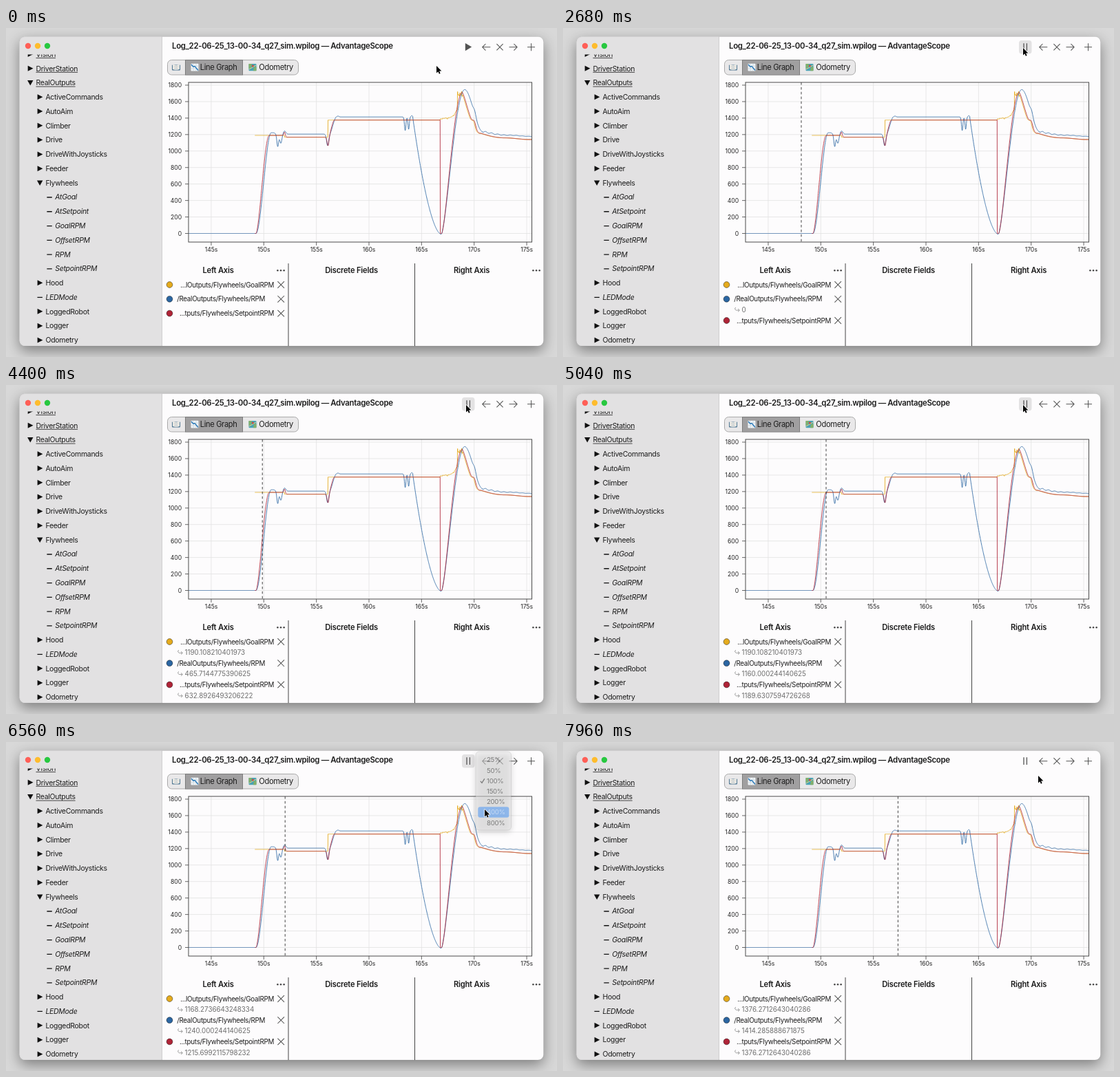
An HTML page with a canvas that plays this animation: 800 px wide and 478 px high, repeating every 8000 ms.

```html
<!DOCTYPE html>
<html lang="en">
<head>
<meta charset="utf-8">
<title>Log viewer</title>
<style>
html, body { margin: 0; width: 100%; height: 100%; overflow: hidden; background: #d8d8d8; }
canvas { display: block; width: 800px; height: 478px; }
</style>
</head>
<body>
<canvas id="stage"></canvas>
<script>
const W = 800, H = 478, LOOP = 8000, STEP = 40;
const canvas = document.getElementById('stage');
const ctx = canvas.getContext('2d');
const dpr = window.devicePixelRatio || 1;
canvas.width = W * dpr;
canvas.height = H * dpr;

const GOLD = '#e5ab1d', BLUE = '#2b66a2', RED = '#af2437', INK = '#1c1c1c', ICON = '#545454';
const GRAPH = { l: 265, t: 79, r: 763.5, b: 311 };
const PX_PER_SEC = 15.27;
const yOf = rpm => 298.5 - rpm * 0.11972;

const SET_TIME = 1400, PLAY_TIME = 2280, FAST_TIME = 6655;
const MENU_OPEN = 5400, MENU_CLOSE = 6480, MENU_FADE = 160;
const START_X = 339.86;

// ---------- motion rules ----------
// Chain of eased moves [from, to, value, skew]; holds each value until the next move
function staged(x, value, stages) {
  for (const [a, b, next, skew = 1] of stages) {
    if (x <= a) break;
    const u = x >= b ? 1 : ((x - a) / (b - a)) ** skew;
    value = u === 1 ? next : value + (next - value) * u * u * (3 - 2 * u);
  }
  return value;
}
function bump(x, center, width, height) {
  const d = (x - center) / width;
  return Math.abs(d) > 3 ? 0 : height * Math.exp(-d * d);
}
function noise(n) {
  const s = Math.sin(n * 12.9898) * 43758.5453;
  return (s - Math.floor(s)) * 2 - 1;
}

// ---------- signals, by horizontal position ----------
const SHOT_1 = 1190.108210401973, SHOT_2 = 1168.2736643248334, SHOT_3 = 1376.2712643040286;
const DATA_X = 361.3, NOISE_X = 630.4, SPIKE_X = 655.5, SPIKE_END = 663;

function wheel(x) {
  if (x > 631.5) {
    const ripple = x > 692 ? 9 * Math.exp((692 - x) / 35) * Math.sin((x - 694) * 0.7) : 0;
    return staged(x, -8, [[632, 666, 1746, 0.8], [666, 692, 1235], [692, 730, 1192, 0.7], [730, 763, 1178]])
      + bump(x, 680.5, 2.5, 45) + ripple;
  }
  if (x > 590.5) return 1422 * ((631.5 - x) / 41) ** 1.7 - 8;
  return staged(x, 0, [[363, 385, 1222], [388, 394, 1205.714], [469, 480, 1414.286]])
    + bump(x, 394.5, 1.75, -150) + bump(x, 399, 2.2, -111) + bump(x, 404.5, 2.5, 38)
    + bump(x, 467, 2.2, -140) + bump(x, 482, 2, 10)
    + bump(x, 579.6, 1.5, -165) + bump(x, 584.6, 1.4, -150) + bump(x, 589.2, 1.4, 16);
}
function setpoint(x) {
  return staged(x, 0, [
    [362.8, 382.256, SHOT_1, 0.9], [403, 408, SHOT_2], [467.5, 477, SHOT_3], [NOISE_X, NOISE_X, 0],
    [632.5, 662.5, 1712, 0.8], [662.5, 689, 1215, 0.7], [690, 725, 1160, 0.6], [725, 760, 1140]
  ]) + bump(x, 404.5, 1.4, 45) + bump(x, 467.5, 1.8, -104) + bump(x, 680, 3, 70);
}
function goal(x) {
  if (x > SPIKE_END) return setpoint(x + 1.3);
  if (x > SPIKE_X) return 1690 + 35 * noise(Math.floor(x * 1.5));
  if (x > NOISE_X) return 1395 + 110 * ((x - NOISE_X) / 25) ** 4 + 10 * noise(Math.floor(x / 1.6));
  return staged(x, SHOT_1, [[404.4, 404.4, SHOT_2], [467.4, 467.4, SHOT_3]]);
}

function trace(signal, from) {
  const path = new Path2D();
  for (let x = from; x <= GRAPH.r; x += 0.25) path.lineTo(x, yOf(signal(x)));
  return path;
}
const TRACES = [
  [trace(goal, DATA_X), GOLD], [trace(wheel, GRAPH.l), BLUE], [trace(setpoint, DATA_X), RED]
];

// ---------- values under the playhead ----------
const goalValue = x => x < DATA_X ? null : goal(x);
const setpointValue = x => x < DATA_X ? null : Math.max(2, setpoint(x));
// Encoder speed: whole ticks, stored in single precision
function wheelValue(x) {
  const tick = Math.round(wheel(x) * 7 / 20);
  return tick <= 0 ? 0 : Math.fround(tick * 20 / 7 + 0.0002);
}

// ---------- timing ----------
function pointerAt(t) {
  return {
    x: staged(t, 625, [[300, 1150, 340], [1500, 2150, 668], [5450, 5950, 695], [6720, 7050, 690]]),
    y: staged(t, 55, [[300, 1150, 190], [1500, 2150, 29], [5450, 5950, 98], [6720, 7050, 49]])
  };
}
function playheadAt(t) {
  if (t < SET_TIME) return null;
  const slow = Math.max(0, Math.min(t, FAST_TIME) - PLAY_TIME);
  const fast = Math.max(0, t - FAST_TIME);
  return START_X + (slow + 4 * fast) * PX_PER_SEC / 1000;
}

// ---------- drawing helpers ----------
function text(s, x, y, size, o = {}) {
  ctx.font = `${o.italic ? 'italic ' : ''}${o.weight || 400} ${size}px Inter, Roboto, sans-serif`;
  ctx.letterSpacing = (o.gap ?? -0.3) + 'px';
  ctx.textAlign = o.align || 'left';
  ctx.fillStyle = o.color || INK;
  ctx.fillText(s, x, y + size * 0.36);
}
function box(x, y, w, h, r, fill, stroke) {
  ctx.beginPath();
  ctx.roundRect(x, y, w, h, r);
  if (fill) { ctx.fillStyle = fill; ctx.fill(); }
  if (stroke) { ctx.strokeStyle = stroke; ctx.lineWidth = 1; ctx.stroke(); }
}
function poly(points, fill) {
  ctx.beginPath();
  for (let i = 0; i < points.length; i += 2) ctx.lineTo(points[i], points[i + 1]);
  ctx.closePath();
  ctx.fillStyle = fill;
  ctx.fill();
}
function line(color, width, ...strokes) {
  ctx.beginPath();
  for (const s of strokes) {
    ctx.moveTo(s[0], s[1]);
    for (let i = 2; i < s.length; i += 2) ctx.lineTo(s[i], s[i + 1]);
  }
  ctx.strokeStyle = color;
  ctx.lineWidth = width;
  ctx.stroke();
}
function dot(x, y, r, fill, stroke) {
  ctx.beginPath();
  ctx.arc(x, y, r, 0, 7);
  ctx.fillStyle = fill;
  ctx.fill();
  if (stroke) { ctx.strokeStyle = stroke; ctx.lineWidth = 0.8; ctx.stroke(); }
}
function cross(x, y, r) {
  line(ICON, 1.05, [x - r, y - r, x + r, y + r], [x + r, y - r, x - r, y + r]);
}
function arrow(x, y, dir) {
  const tip = x + dir * 5.8, back = tip - dir * 4.7;
  line(ICON, 1.05, [x - dir * 5.8, y, tip, y], [back, y - 4.8, tip, y, back, y + 4.8]);
}

// ---------- parts ----------
// kind: > closed group, v open group, - field
const TREE = [
  '0>Vision', '0>DriverStation', '0vRealOutputs', '1>ActiveCommands', '1>AutoAim', '1>Climber',
  '1>Drive', '1>DriveWithJoysticks', '1>Feeder', '1vFlywheels', '2-AtGoal', '2-AtSetpoint',
  '2-GoalRPM', '2-OffsetRPM', '2-RPM', '2-SetpointRPM', '1>Hood', '1-LEDMode',
  '1>LoggedRobot', '1>Logger', '1>Odometry'
];
function sidebar() {
  ctx.fillStyle = '#e2e1e2';
  ctx.fillRect(19, 12, 207.5, 451);
  line('#cfcecf', 1, [226.5, 12, 226.5, 463]);
  ['#ff5f57', '#febc2e', '#28c840'].forEach((c, i) => dot(32 + 14 * i, 26, 4.2, c));
  ctx.save();
  ctx.beginPath();
  ctx.rect(19, 38.5, 207, 424);
  ctx.clip();
  TREE.forEach((row, i) => {
    const level = +row[0], kind = row[1], name = row.slice(2);
    const y = 38 + 20.77 * i, x = 35.3 + 13.9 * level, tx = x + 8.2;
    if (kind === '>') poly([x - 3.6, y - 4, x + 4.2, y, x - 3.6, y + 4], '#111');
    else if (kind === 'v') poly([x - 4.2, y - 3.5, x + 4.2, y - 3.5, x, y + 4], '#111');
    else line('#111', 1.3, [x - 3.7, y + 0.3, x + 3.7, y + 0.3]);
    text(name, tx, y, 10.5, { italic: kind === '-' });
    if (level === 0) {
      const w = ctx.measureText(name).width;
      line(INK, 0.8, [tx, y + 5.6, tx + w, y + 5.6]);
    }
  });
  ctx.restore();
}

function tabs() {
  box(234.5, 46.5, 190, 21.5, 6, '#e9e8e9', '#aaa');
  ctx.fillStyle = '#a09fa0';
  ctx.fillRect(260, 47, 84, 20.5);
  ctx.strokeStyle = '#7c7c7c';
  ctx.strokeRect(260.5, 46.5, 83, 21.5);
  // book
  box(241, 53.5, 12, 8, 1, '#4b7390');
  poly([242, 53, 246.8, 54, 246.8, 61, 242, 60], '#f4f1ea');
  poly([252, 53, 247.2, 54, 247.2, 61, 252, 60], '#f4f1ea');
  for (const y of [55.5, 58]) line('#a9b0b5', 0.6, [243, y, 246, y + 0.5], [248, y + 0.5, 251, y]);
  // falling chart
  box(268.5, 51.7, 11, 10.8, 1, '#f1f5f8');
  line('#b9cbd6', 0.6, [272, 52, 272, 62], [276, 52, 276, 62], [269, 55.3, 279, 55.3], [269, 59, 279, 59]);
  line('#2878b8', 1.4, [269, 53, 272, 56.5, 274, 55.5, 279, 61.5]);
  // map
  box(352.5, 52, 11, 10.3, 1, '#49a3b5');
  poly([352.5, 52, 357, 52, 355.5, 58, 352.5, 59], '#83b06a');
  poly([359, 62.3, 360, 57, 363.5, 56, 363.5, 62.3], '#83b06a');
  line('#e6d587', 1, [353, 60, 358, 57, 363, 54]);
  dot(358.3, 55, 1.5, '#cf4a3c');
  text('Line Graph', 281.7, 57, 11.1, { gap: -0.33 });
  text('Odometry', 367.3, 57, 11.1, { gap: -0.33 });
}

function toolbar(t, hot) {
  text('Log_22-06-25_13-00-34_q27_sim.wpilog — AdvantageScope', 241, 26.2, 11.4, { weight: 600, gap: -0.31 });
  if (hot) box(662, 18, 18.5, 19.5, 4, '#e3e2e3');
  if (t < PLAY_TIME) poly([666.8, 22, 676.2, 27.6, 666.8, 33.2], ICON);
  else line(ICON, 1.3, [669, 22.3, 669, 33], [673.4, 22.3, 673.4, 33]);
  const y = 27.8;
  arrow(697.5, y, -1);
  cross(717, y, 4.6);
  arrow(736.3, y, 1);
  line(ICON, 1.05, [757, y, 768, y], [762.5, y - 5.5, 762.5, y + 5.5]);
}

function playhead(x, alpha) {
  ctx.save();
  ctx.globalAlpha = alpha;
  ctx.setLineDash([3.6, 3.3]);
  line('#222', 0.85, [x, GRAPH.t, x, GRAPH.b]);
  ctx.restore();
}

function graph(head, hover) {
  const { l, t, r, b } = GRAPH;
  const label = { gap: -0.05, color: '#222' };
  for (let v = 0; v <= 1800; v += 200) {
    const y = yOf(v);
    line('#e2e2e2', 0.8, [l, y, r, y]);
    line('#555', 0.9, [l - 5, y, l, y]);
    text(v, 255, y, 8.6, { ...label, align: 'right' });
  }
  for (let s = 145; s <= 175; s += 5) {
    const x = 374.3 + (s - 150) * PX_PER_SEC;
    line('#e2e2e2', 0.8, [x, t, x, b]);
    line('#555', 0.9, [x, b, x, b + 5]);
    text(s + 's', x, 321.5, 8.6, { ...label, align: 'center' });
  }
  ctx.save();
  ctx.beginPath();
  ctx.rect(l, t, r - l, b - t);
  ctx.clip();
  ctx.lineWidth = 0.85;
  ctx.lineJoin = 'round';
  for (const [path, color] of TRACES) {
    ctx.strokeStyle = color;
    ctx.stroke(path);
  }
  if (head !== null) playhead(head, 1);
  if (hover !== null) playhead(hover, 0.35);
  ctx.restore();
  ctx.strokeStyle = '#4a4a4a';
  ctx.lineWidth = 1;
  ctx.strokeRect(l, t, r - l, b - t);
}

function more(x) {
  for (let i = -1; i <= 1; i++) dot(x + i * 4.6, 352.3, 1.25, '#444');
}

function legend(head) {
  const bold = { weight: 600, align: 'center', gap: -0.22 };
  text('Left Axis', 308, 352.3, 11.2, bold);
  text('Discrete Fields', 501.5, 352.3, 11.2, bold);
  text('Right Axis', 676, 352.3, 11.2, bold);
  more(399);
  more(770);
  line('#444', 1, [410, 342, 410, 462], [593.5, 342, 593.5, 462]);
  const rows = [
    [GOLD, '...lOutputs/Flywheels/GoalRPM', goalValue, 389],
    [BLUE, '/RealOutputs/Flywheels/RPM', wheelValue, 376],
    [RED, '...tputs/Flywheels/SetpointRPM', setpointValue, 389]
  ];
  let y = 373;
  for (const [color, name, valueAt, right] of rows) {
    dot(237.5, y, 4.4, color, 'rgba(0,0,0,.55)');
    text(name, right, y, 9.8, { align: 'right', gap: -0.27 });
    cross(399.2, y, 4.8);
    const value = head === null ? null : valueAt(head);
    if (value !== null) {
      const v = y + 15.6;
      line('#888', 0.8, [256, v + 0.7, 251.3, v + 0.7, 249.8, v - 0.6, 249.8, v - 2.5, 251, v - 3.4],
        [254, v - 1.5, 256.4, v + 0.7, 254, v + 2.9]);
      text(value, 259.6, v, 9.8, { gap: -0.04, color: '#6e6e6e' });
      y += 10.4;
    }
    y += 20.8;
  }
}

function menu(t, p) {
  ctx.save();
  ctx.globalAlpha = Math.min(1, 1 - (t - MENU_CLOSE) / MENU_FADE);
  ctx.shadowColor = 'rgba(0,0,0,.32)';
  ctx.shadowBlur = 9 * dpr;
  ctx.shadowOffsetY = 3 * dpr;
  box(682, 14, 51.5, 114, 5, '#e8e7e8');
  ctx.shadowColor = 'transparent';
  box(682, 14, 51.5, 114, 5, null, 'rgba(0,0,0,.16)');
  [25, 50, 100, 150, 200, 400, 800].forEach((speed, i) => {
    const y = 26 + 15.2 * i;
    const on = p.x > 682 && Math.abs(p.y + 3 - y) < 7.6;
    if (on) box(685.3, y - 7.7, 45, 15.4, 3, '#3f8ff7');
    text(speed + '%', 698, y, 9.6, { gap: -0.27, color: on ? '#fff' : INK });
  });
  line(INK, 1.3, [688.8, 56.8, 691, 59.4, 694.8, 53.4]);
  ctx.restore();
}

function pointer(p) {
  const shape = [0, 0, 0, 10.4, 2.4, 8.2, 3.9, 11.8, 5.6, 11.1, 4.1, 7.5, 7.4, 7.4];
  ctx.save();
  ctx.translate(p.x, p.y);
  ctx.lineJoin = 'round';
  poly(shape, '#000');
  ctx.strokeStyle = '#fff';
  ctx.lineWidth = 1.5;
  ctx.stroke();
  poly(shape, '#000');
  ctx.restore();
}

function draw(t) {
  ctx.setTransform(dpr, 0, 0, dpr, 0, 0);
  ctx.fillStyle = '#d8d8d8';
  ctx.fillRect(0, 0, W, H);
  ctx.save();
  ctx.shadowColor = 'rgba(0,0,0,.42)';
  ctx.shadowBlur = 20 * dpr;
  ctx.shadowOffsetY = 7 * dpr;
  box(19.5, 12.5, 761, 449.5, 8, '#fdfcfd');
  ctx.restore();

  const p = pointerAt(t), head = playheadAt(t);
  const menuOpen = t >= MENU_OPEN && t < MENU_CLOSE + MENU_FADE;
  const onGraph = p.x > GRAPH.l && p.x < GRAPH.r && p.y > GRAPH.t && p.y < GRAPH.b;
  const onButton = p.x > 662 && p.x < 680.5 && p.y > 18 && p.y < 37.5;

  ctx.save();
  ctx.beginPath();
  ctx.roundRect(19.5, 12.5, 761, 449.5, 8);
  ctx.clip();
  sidebar();
  toolbar(t, onButton || menuOpen);
  tabs();
  graph(head, onGraph && !menuOpen ? p.x : null);
  legend(head);
  ctx.restore();
  box(19.5, 12.5, 761, 449.5, 8, null, 'rgba(0,0,0,.08)');
  if (menuOpen) menu(t, p);
  pointer(p);
}

const start = performance.now();
function tick() {
  const t = (performance.now() - start) % LOOP;
  draw(Math.floor(t / STEP) * STEP);
  requestAnimationFrame(tick);
}
tick();
</script>
</body>
</html>
```
